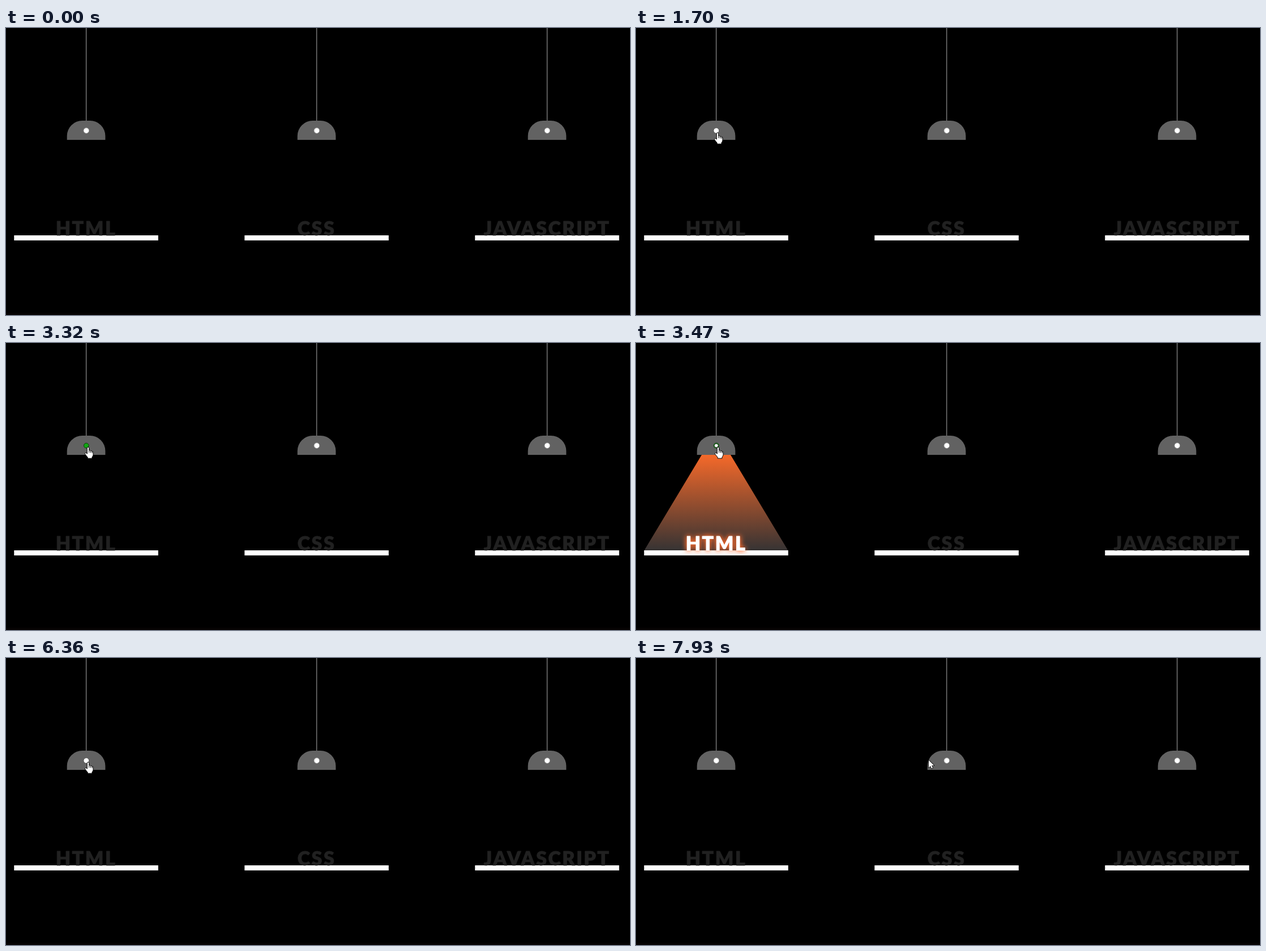
An HTML page with a canvas for the animation above (7990 ms loop, 1102 px wide and 508 px high).

```html
<!DOCTYPE html>
<html lang="en">
<head>
<meta charset="utf-8">
<title>Lamps</title>
<style>
  html, body { margin: 0; width: 100%; height: 100%; overflow: hidden; background: #000; }
  canvas { display: block; }
</style>
</head>
<body>
<canvas id="stage" width="1102" height="508"></canvas>
<script>
const ctx = document.getElementById('stage').getContext('2d');
const LOOP = 7990;
const GREY = '#626262';
const LAMPS = [
  { x: 141.5, label: 'HTML' },
  { x: 548.5, label: 'CSS' },
  { x: 955.5, label: 'JAVASCRIPT' }
];

const easeOut = p => 1 - (1 - p) ** 2;
const smooth = p => p * p * (3 - 2 * p);
const linear = p => p;

// The pointer moves in discrete steps; the first step happens at `start`.
const MOVES = [
  { start: 350, end: 1060, steps: 10, from: [1065, 548], to: [306, 263], ease: easeOut },
  { start: 1150, end: 1760, steps: 9, from: [306, 263], to: [138, 182], ease: smooth },
  { start: 2010, end: 2160, steps: 3, from: [138, 182], to: [149, 187], ease: linear },
  { start: 2690, end: 2790, steps: 2, from: [141, 182], to: [137, 182], ease: linear },
  { start: 2930, end: 3160, steps: 4, from: [137, 182], to: [145, 184], ease: linear },
  { start: 7370, end: 7930, steps: 8, from: [145, 184], to: [517, 181], ease: smooth }
];

const HAND = new Path2D(
  'M-1.7 12V1.8Q-1.7.3 0 .3T1.7 1.8V6.2Q4 5.2 4.6 7Q6.7 6 7.2 8Q9 7.4 9 9.6V13.5' +
  'Q9 16 7 18V20.2H-.8V18.4L-5 13.2Q-6.2 11-4.6 10.4Q-3.4 10.2-1.7 12Z' +
  'M1.8 6.5V10M4.6 7V10.4M7.2 8V10.8');
const ARROW = new Path2D('M0 0V13L3 10.2 4.9 14.4 7 13.5 5.2 9.3H9.4Z');

function pointerAt(t) {
  const move = MOVES.filter(m => t >= m.start).pop();
  if (!move) return null;
  const { start, end, steps, from, to, ease } = move;
  const step = Math.floor((t - start) / (end - start) * (steps - 1) + 1e-6);
  const p = ease(Math.min(1, (step + 1) / steps));
  return from.map((v, i) => Math.round(v + (to[i] - v) * p));
}

function disc(x, y, r, fill, stroke) {
  ctx.beginPath();
  ctx.arc(x, y, r, 0, Math.PI * 2);
  ctx.fillStyle = fill;
  ctx.fill();
  ctx.strokeStyle = stroke;
  ctx.lineWidth = 1;
  ctx.stroke();
}

function drawBeam(x) {
  const glow = ctx.createLinearGradient(0, 198, 0, 367);
  glow.addColorStop(0, '#f5692a');
  glow.addColorStop(1, '#363333');
  ctx.fillStyle = glow;
  ctx.beginPath();
  ctx.moveTo(x - 25.5, 198);
  ctx.lineTo(x + 25.5, 198);
  ctx.lineTo(x + 127.2, 367.5);
  ctx.lineTo(x - 127.2, 367.5);
  ctx.fill();
}

function drawLabel(text, x, lit) {
  ctx.save();
  ctx.font = '900 34px Lato, sans-serif';
  ctx.letterSpacing = '2.5px';
  ctx.textAlign = 'center';
  ctx.lineJoin = 'round';
  ctx.lineWidth = 0.8;
  ctx.fillStyle = ctx.strokeStyle = lit ? '#fff' : '#212121';
  if (lit) {
    ctx.shadowColor = '#ff6a2a';
    ctx.shadowBlur = 10;
    ctx.fillText(text, x, 367);
  }
  ctx.fillText(text, x, 367);
  ctx.shadowColor = 'transparent';
  ctx.strokeText(text, x, 367);
  ctx.restore();
}

function drawSwitch(x, { pressed, lit, hover }) {
  const y = 181.6;
  if (pressed) disc(x, y, 4.4, '#12a512', '#0b3d0b');
  else if (lit) {
    disc(x, y, 4.7, '#2a9c2a', '#174517');
    disc(x, y, 3.4, '#fff', '#163c16');
  } else disc(x, y, 4.9, '#fff', hover ? '#4f4f4f' : '#8a8a8a');
}

function drawLamp({ x, label }, state) {
  ctx.fillStyle = '#777';
  ctx.fillRect(x - 0.6, 0, 1.5, 165);
  if (state.lit) drawBeam(x);
  ctx.fillStyle = GREY;
  ctx.beginPath();
  ctx.roundRect(x - 33.8, 164, 67.7, 34, [27, 27, 0, 0]);
  ctx.fill();
  drawSwitch(x + 0.3, state);
  ctx.fillStyle = '#fff';
  ctx.fillRect(x - 127.2, 367, 254.5, 9);
  drawLabel(label, x, state.lit);
}

function drawPointer([x, y], hover) {
  ctx.save();
  ctx.translate(x, y);
  ctx.lineJoin = 'round';
  ctx.strokeStyle = '#000';
  ctx.fillStyle = '#fff';
  const shape = hover ? HAND : ARROW;
  ctx.lineWidth = hover ? 1 : 1.6;
  if (hover) {
    ctx.fill(shape);
    ctx.stroke(shape);
  } else {
    ctx.stroke(shape);
    ctx.fill(shape);
  }
  ctx.restore();
}

function draw(t) {
  ctx.fillStyle = '#000';
  ctx.fillRect(0, 0, 1102, 508);
  ctx.fillStyle = '#060303';
  ctx.fillRect(0, 504, 1102, 4);

  const pointer = pointerAt(t);
  const hover = !!pointer && Math.hypot(pointer[0] - 142, pointer[1] - 181.5) < 6;
  const active = {
    hover,
    lit: t >= 3470 && t < 6360,
    pressed: (t >= 3320 && t < 3470) || (t >= 6060 && t < 6360)
  };
  LAMPS.forEach((lamp, i) => drawLamp(lamp, i ? {} : active));
  if (pointer) drawPointer(pointer, hover);
}

const origin = performance.now();
function tick() {
  draw((performance.now() - origin) % LOOP);
  requestAnimationFrame(tick);
}
tick();
</script>
</body>
</html>
```
